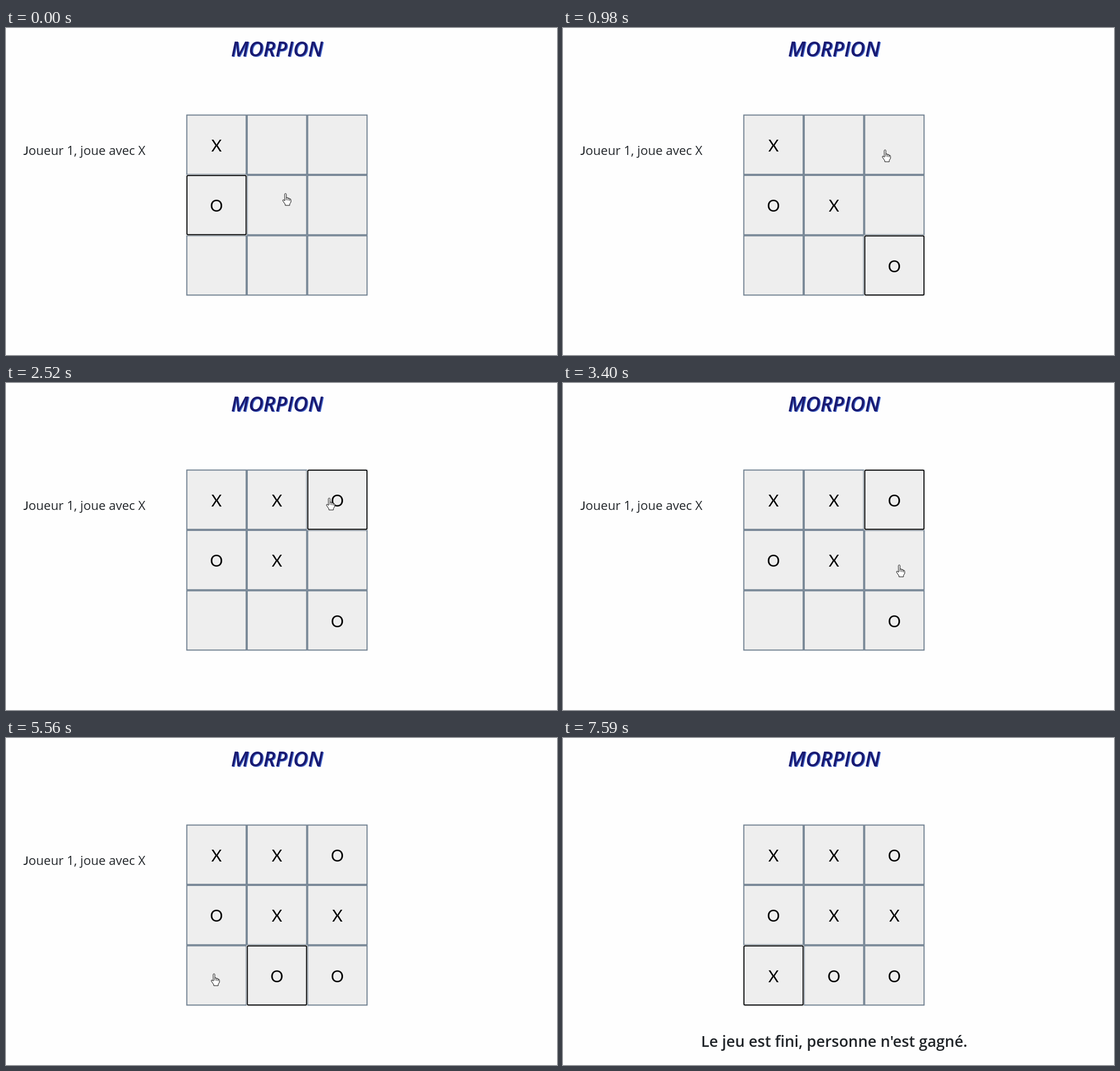
An HTML page for the animation above (8 s loop, 971 by 577 pixels).

```html
<!DOCTYPE html>
<html lang="fr">
<head>
<meta charset="utf-8">
<title>Morpion</title>
<style>
  html, body { margin: 0; width: 100%; height: 100%; overflow: hidden; background: #fefefe; }
  svg { display: block; width: 100%; height: 100%; }
  text { font-family: "Open Sans", "Noto Sans", sans-serif; fill: #212529; }
  .title { font-size: 36px; font-weight: 600; font-style: italic; fill: #191970; text-shadow: 1.5px 1px 0 #4a6fd0; }
  .player { font-size: 22px; }
  .cap { font-family: Lato, sans-serif; }
  .result { font-size: 26.9px; font-weight: 600; }
  .mark { font: 28.5px Lato, sans-serif; fill: #000; }
  .cell { fill: #eee; stroke: #708090; stroke-width: 1.9; }
  .ring { fill: none; }
  .pointer { fill: #fff; stroke: #111; stroke-linejoin: round; stroke-linecap: round; }
</style>
</head>
<body>
<svg viewBox="0 0 971 577">
  <text class="title" x="477.5" y="50" text-anchor="middle">MORPION</text>
  <text class="player" id="player1" x="30.5" y="224"><tspan class="cap">J</tspan>oueur 1, joue avec X</text>
  <text class="player" id="player2" x="707.5" y="224"><tspan class="cap">J</tspan>oueur 2, joue avec O</text>
  <g id="board"></g>
  <g id="focus" class="ring">
    <rect x="-.4" y="-.4" width="107.3" height="107.3" rx="3" stroke="#fff"/>
    <rect x="1.1" y="1.1" width="104.4" height="104.4" rx="2" stroke="#101010" stroke-width="1.9"/>
  </g>
  <text class="result" id="result" x="478" y="545" text-anchor="middle">Le jeu est fini, personne n'est gagné.</text>
  <g id="pointer" class="pointer">
    <g id="hand">
      <path d="M-4-8.5Q-4-10-2.5-10T-1-8.5V-2.7Q1.8-3.5 2-1.7Q4.6-2.5 4.8-.5Q7.2-.9 7.2 1.5V5L5 8.5V11H-3V9L-7.2 3Q-7.6 .5-5.4 1.1L-4 2.7Z"/>
      <path d="M-1-2.5V1.5M2-1.5V2M4.8-.5V2.5" fill="none"/>
    </g>
    <path id="arrow" d="M-6-9V7L-2.3 3.6L.2 9.3L2.8 8.2L.3 2.6H5.2Z"/>
  </g>
</svg>
<script>
const LOOP = 8000, FRAME = 142, LEFT = 317.7, TOP = 152.7, SIZE = 106.5;
const $ = id => document.getElementById(id);

// The pointer glides to x, y in jumps of about one FRAME.
const glides = [
  { from: 0, to: 0, x: 495, y: 302 },
  { from: 150, to: 460, x: 578, y: 423 },
  { from: 740, to: 980, x: 570, y: 225 },
  { from: 1270, to: 1660, x: 503, y: 220 },
  { from: 1950, to: 2230, x: 572, y: 213 },
  { from: 2520, to: 2950, x: 592, y: 341 },
  { from: 3100, to: 3400, x: 595, y: 331 },
  { from: 3520, to: 3940, x: 476, y: 428 },
  { from: 4800, to: 5560, x: 369, y: 426 },
  { from: 6230, to: 6650, x: 907, y: 548 },
  { from: 6930, to: 7070, x: 495, y: 255 },
  { from: 7070, to: 7460, x: 336, y: 166 }
];
const offPage = t => t >= 6790 && t < 7070 || t >= 7590;

function pointerAt(t) {
  const i = glides.findLastIndex(g => g.from <= t);
  const { from, to, x, y } = glides[i], start = glides[i - 1] || glides[i];
  const steps = Math.max(1, Math.round((to - from) / FRAME));
  const done = t >= to ? 1 : Math.floor((t - from) / (to - from) * steps) / steps;
  return { x: start.x + (x - start.x) * done, y: start.y + (y - start.y) * done };
}

const cellAt = ({ x, y }) => Math.floor((x - LEFT) / SIZE) + 3 * Math.floor((y - TOP) / SIZE);
const cellX = i => LEFT + i % 3 * SIZE;
const cellY = i => TOP + Math.floor(i / 3) * SIZE;
const show = (el, on) => el.setAttribute("visibility", on ? "visible" : "hidden");
const place = (el, x, y) => el.setAttribute("transform", `translate(${x} ${y})`);

function add(tag, attrs) {
  const el = document.createElementNS("http://www.w3.org/2000/svg", tag);
  for (const name in attrs) el.setAttribute(name, attrs[name]);
  return $("board").appendChild(el);
}

for (let i = 0; i < 9; i++) {
  add("rect", { class: "cell", x: cellX(i) + .9, y: cellY(i) + .9, width: SIZE - 1.8, height: SIZE - 1.8 });
}

// Two turns are already played; each click then marks the cell under the pointer.
const clicks = [150, 740, 1950, 2520, 3520, 4800, 5820];
const turns = [
  { time: 0, cell: 0 }, { time: 0, cell: 3 },
  ...clicks.map(time => ({ time, cell: cellAt(pointerAt(time)) }))
];
for (const [i, turn] of turns.entries()) {
  turn.mark = add("text", {
    class: "mark", x: cellX(turn.cell) + SIZE / 2, y: cellY(turn.cell) + 64.8, "text-anchor": "middle"
  });
  turn.mark.textContent = "XO"[i % 2];
}

function render(t) {
  for (const { time, mark } of turns) show(mark, time <= t);
  const played = turns.filter(turn => turn.time <= t).length;
  const { cell } = turns[played - 1], over = played === 9;
  place($("focus"), cellX(cell), cellY(cell));
  show($("player1"), !over && played % 2 === 0);
  show($("player2"), !over && played % 2 === 1);
  show($("result"), over);

  const { x, y } = pointerAt(t), onBoard = x < LEFT + 3 * SIZE;
  place($("pointer"), x, y);
  show($("hand"), !offPage(t) && onBoard);
  show($("arrow"), !offPage(t) && !onBoard);
}

const start = performance.now();
function tick() {
  render((performance.now() - start) % LOOP);
  requestAnimationFrame(tick);
}
tick();
</script>
</body>
</html>
```
